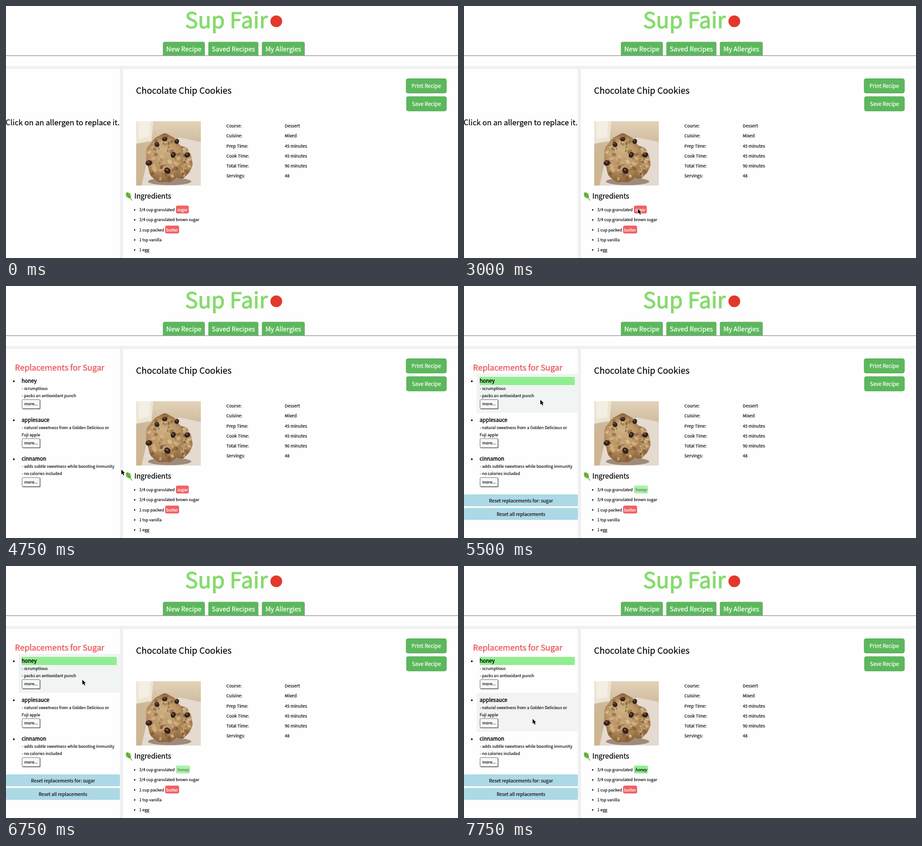
Animation, 1000 px wide and 560 px high, one loop 8000 ms. Source, as an HTML page with a canvas:

```html
<!DOCTYPE html>
<html lang="en">
<head>
<meta charset="utf-8">
<title>Recipe allergen replacement</title>
<style>
html, body { margin: 0; width: 100%; height: 100%; overflow: hidden; background: #fefefe; }
canvas { display: block; width: 1000px; height: 560px; }
</style>
</head>
<body>
<canvas id="stage"></canvas>
<script>
const LOOP = 8000, STEP = 250;
const FAMILY = '"Noto Sans CJK JP", "Noto Sans CJK SC", "Noto Sans CJK KR", "Noto Sans CJK TC", "Noto Sans CJK", "Open Sans", sans-serif';
const FONT_SCALE = 1 / 1.117; // this family's Latin letters run large
const GREEN = '#5cb85c', RED = '#f06263', MINT = '#90ee90', BLUE = '#add8e6', BLACK = '#050505';
const SMALL = 10.04, ROW = 22.25, SWAP_ROW = 86.6;

const canvas = document.getElementById('stage');
const ctx = canvas.getContext('2d');
const ratio = window.devicePixelRatio || 1;
canvas.width = 1000 * ratio;
canvas.height = 560 * ratio;

const linear = u => u;
const easeIn = power => u => u ** power;
const easeOut = power => u => 1 - (1 - u) ** power;

// The pointer rests between moves; x and y may ease differently.
const MOVES = [
  { start: 500, end: 1500, from: [410, 194], to: [427, 444], easeX: easeOut(4), easeY: easeOut(4) },
  { start: 1500, end: 2250, from: [427, 444], to: [384, 450], easeX: easeOut(2), easeY: easeOut(2) },
  { start: 4000, end: 5250, from: [384, 450], to: [168, 252], easeX: linear, easeY: easeIn(3) },
  { start: 6750, end: 7750, from: [168, 252], to: [151, 339], easeX: easeOut(2), easeY: easeOut(2) }
];

const DETAILS = [
  ['Course:', 'Dessert'], ['Cuisine:', 'Mixed'], ['Prep Time:', '45 minutes'],
  ['Cook Time:', '45 minutes'], ['Total Time:', '90 minutes'], ['Servings:', '48']
];
const INGREDIENTS = [
  '3/4 cup granulated', '3/4 cup granulated brown sugar', '1 cup packed', '1 tsp vanilla', '1 egg'
];
const SWAPS = [
  ['honey', '- scrumptious', '- packs an antioxidant punch'],
  ['applesauce', '- natural sweetness from a Golden Delicious or', 'Fuji apple'],
  ['cinnamon', '- adds subtle sweetness while boosting immunity', '- no calories included']
];

function seeded(seed) {
  return () => (seed = seed * 16807 % 2147483647) / 2147483647;
}

function text(str, x, y, size, { color = BLACK, align = 'left', heavy = .18, italic = false } = {}) {
  ctx.font = `${italic ? 'italic ' : ''}400 ${size * FONT_SCALE}px ${FAMILY}`;
  ctx.textAlign = align;
  ctx.lineJoin = 'round';
  ctx.lineWidth = heavy;
  ctx.fillStyle = ctx.strokeStyle = color;
  ctx.fillText(str, x, y);
  ctx.strokeText(str, x, y);
}

function rect(x, y, w, h, color) {
  ctx.fillStyle = color;
  ctx.fillRect(x, y, w, h);
}

function box(x, y, w, h, r, fill, border) {
  ctx.beginPath();
  ctx.roundRect(x, y, w, h, r);
  ctx.fillStyle = fill;
  ctx.fill();
  if (border) {
    ctx.strokeStyle = border;
    ctx.lineWidth = 1;
    ctx.stroke();
  }
}

function oval(x, y, rx, ry, color, turn = 0) {
  ctx.beginPath();
  ctx.ellipse(x, y, rx, ry, turn, 0, 2 * Math.PI);
  ctx.fillStyle = color;
  ctx.fill();
}

function shape(points, color) {
  ctx.beginPath();
  points.forEach(([x, y]) => ctx.lineTo(x, y));
  ctx.closePath();
  ctx.fillStyle = color;
  ctx.fill();
}

function drawHeader() {
  text('Sup Fair', 396, 49, 54, { color: '#86db6d', heavy: 1.3 });
  oval(598, 34, 13, 13, '#e2382c');

  let x = 347;
  ['New Recipe', 'Saved Recipes', 'My Allergies'].forEach(label => {
    ctx.font = `400 ${16 * FONT_SCALE}px ${FAMILY}`;
    const w = Math.round(ctx.measureText(label).width + 15.5);
    box(x + .5, 80, w - 1, 30, [3, 3, 0, 0], GREEN, '#78ad78');
    text(label, x + w / 2, 101, 16, { color: '#fff', align: 'center', heavy: .25 });
    x += w + 7.5;
  });
  rect(0, 109.7, 1000, 1.4, '#929292');
  rect(0, 133, 1000, 7, '#f0f0f0');
  rect(252, 133, 7, 427, '#f0f0f0');
}

function drawCookie(x, y, rx, ry, seed) {
  const random = seeded(seed);
  const edge = Array.from({ length: 60 }, (_, i) => {
    const a = i * Math.PI / 30;
    const k = 1 + .025 * Math.sin(5 * a + seed) + .015 * Math.sin(11 * a);
    return [x + rx * k * Math.cos(a), y + ry * k * Math.sin(a)];
  });
  const tone = ctx.createRadialGradient(x - 3, y - ry * .4, 4, x, y, ry * 1.05);
  tone.addColorStop(0, '#cdae80');
  tone.addColorStop(.6, '#b89262');
  tone.addColorStop(1, '#855b33');
  shape(edge, tone);

  for (let i = 0; i < 90; i++) {
    const a = random() * 2 * Math.PI, d = Math.sqrt(random()) * .92, size = 1 + random() * 3;
    const color = random() < .5 ? 'rgba(105,68,36,.45)' : 'rgba(226,200,158,.5)';
    oval(x + rx * d * Math.cos(a), y + ry * d * Math.sin(a), size * 1.4, size, color, a);
  }
}

function drawPhoto() {
  ctx.save();
  ctx.beginPath();
  ctx.rect(288, 256, 143, 143);
  ctx.clip();
  ctx.translate(288, 256);

  const back = ctx.createLinearGradient(0, 0, 0, 143);
  back.addColorStop(0, '#e2d3b9');
  back.addColorStop(.4, '#ccb798');
  back.addColorStop(1, '#cfb692');
  rect(0, 0, 143, 143, back);

  shape([[0, 0], [38, 0], [34, 44], [0, 50]], '#ece5d3');
  shape([[4, 0], [31, 0], [29, 34], [6, 40]], '#f4efe2');
  shape([[12, 143], [28, 70], [95, 36], [143, 46], [143, 143]], '#e4dad0');

  oval(74, 134, 48, 8, 'rgba(112,88,66,.6)');
  drawCookie(97, 91, 27, 36, 7);
  drawCookie(63, 83, 41, 54, 3);

  [[63, 40], [46, 52], [82, 75], [28, 93], [69, 110], [90, 45], [113, 75]].forEach(([x, y], i) => {
    const size = 4.5 + Math.min(y, 110) / 35;
    oval(x, y, size, size * .85, '#35221b', i);
    oval(x - 1, y - 2, size * .4, size * .2, '#866553', .4);
  });
  ctx.restore();
}

function drawLeaf() {
  const side = sign => Array.from({ length: 13 }, (_, i) => {
    const u = i / 12;
    return [u * 17, sign * (5.2 * Math.sin(Math.PI * u ** .8) + .6 * Math.sin(u * 20))];
  });
  ctx.save();
  ctx.translate(266.3, 414.5);
  ctx.rotate(.95);
  shape([...side(1), ...side(-1).reverse()], '#6fb63a');
  rect(2, -.6, 20, 1.2, '#549b2d');
  ctx.restore();
}

function drawTag(word, w, x, y, fill, style) {
  box(x, y, w, 17.6, 3.5, fill);
  text(word, x + w / 2, y + 12.7, SMALL, { align: 'center', heavy: .25, ...style });
}

function drawRecipe({ open, replaced, overHoney }) {
  text('Chocolate Chip Cookies', 287.4, 194.5, 21.54, { heavy: .25 });
  ['Print Recipe', 'Save Recipe'].forEach((label, i) => {
    const w = 89 - i * .7, y = 161.5 + i * 39.8;
    box(974.3 - w, y, w, 32, 4, GREEN, '#4cab4c');
    text(label, 974.3 - w / 2, y + 20.5, 12.86, { color: '#fff', align: 'center', heavy: .25 });
  });

  drawPhoto();
  DETAILS.forEach(([label, value], i) => {
    const y = 270 + i * ROW;
    text(label, 487.6, y, 10.73);
    text(value, 616.8, y, 10.73);
  });

  drawLeaf();
  text('Ingredients', 283.9, 428, 17.25, { heavy: .25 });
  INGREDIENTS.forEach((item, i) => {
    const y = 456 + i * ROW;
    oval(284.7, y - 3, 1.6, 1.6, BLACK);
    text(item, 294.8, y, SMALL);
  });

  if (!replaced) {
    drawTag('sugar', 28.4, 376, 443.4, RED, { color: '#fff', italic: open });
  } else {
    const style = overHoney ? { color: '#4c624c', heavy: .1 } : {};
    drawTag('honey', 31, 376, 443.4, overHoney ? '#a9f2a9' : MINT, { italic: true, ...style });
  }
  drawTag('butter', 31, 352, 443.4 + 2 * ROW, RED, { color: '#fff' });
}

function drawSwaps({ replaced, hovered }) {
  text('Replacements for Sugar', 19.8, 187.5, 20, { color: '#ee5c60', heavy: .5 });
  if (hovered >= 0) {
    rect(28, 195 + hovered * SWAP_ROW, 224, SWAP_ROW, hovered === 0 ? '#f0f4f2' : '#f3f3f3');
  }
  if (replaced) rect(35, 202, 210, 18, MINT);

  SWAPS.forEach(([name, first, second], i) => {
    const y = 215.2 + i * SWAP_ROW;
    oval(17.3, y - 3.5, 1.9, 1.9, BLACK);
    text(name, 34.6, y, 12.9, { heavy: .45 });
    text(first, 34.8, y + 16, SMALL);
    text(second, 34.8, y + 32, SMALL);
    box(36, y + 37.8, 40.3, 21, 2, '#777');
    box(35.5, y + 37.3, 39.5, 20, 2, '#f8f8f8', '#686868');
    text('more...', 55.3, y + 50.2, SMALL, { align: 'center' });
  });

  if (replaced) {
    ['Reset replacements for: sugar', 'Reset all replacements'].forEach((label, i) => {
      const y = 463 + i * 30.2;
      box(0, y, 252, 26.5, 3, BLUE);
      text(label, 126, y + 17.5, 11.45, { align: 'center' });
    });
  }
}

function drawPointer({ x, y }) {
  ctx.save();
  ctx.translate(x + .8, y + .8);
  ctx.beginPath();
  [[0, 0], [0, 10.6], [2.5, 8.4], [4.4, 12.8], [6.3, 12], [4.5, 7.7], [7.8, 7.6]]
    .forEach(([px, py]) => ctx.lineTo(px, py));
  ctx.closePath();
  ctx.lineJoin = 'round';
  ctx.strokeStyle = '#fff';
  ctx.lineWidth = 1.6;
  ctx.stroke();
  ctx.fillStyle = '#000';
  ctx.fill();
  ctx.restore();
}

function pointerAt(time) {
  const move = MOVES.filter(({ start }) => start <= time).pop();
  if (!move) return null;
  const { start, end, from, to, easeX, easeY } = move;
  const u = Math.min(1, (time - start) / (end - start));
  return {
    x: from[0] + (to[0] - from[0]) * easeX(u),
    y: from[1] + (to[1] - from[1]) * easeY(u)
  };
}

function hoveredSwap({ x, y }) {
  if (x < 28 || x >= 252) return -1;
  const row = Math.floor((y - 195) / SWAP_ROW);
  return row >= 0 && row < SWAPS.length ? row : -1;
}

function draw(time) {
  const pointer = pointerAt(time);
  const open = time >= 3500;
  const hovered = open ? hoveredSwap(pointer) : -1;
  const state = { open, replaced: time >= 5500, hovered, overHoney: hovered === 0 };

  ctx.setTransform(ratio, 0, 0, ratio, 0, 0);
  rect(0, 0, 1000, 560, '#fefefe');
  drawHeader();
  drawRecipe(state);
  if (open) drawSwaps(state);
  else text('Click on an allergen to replace it.', -.8, 264.5, 18.65, { heavy: .25 });
  if (pointer) drawPointer(pointer);
}

const begin = performance.now();
function tick() {
  const time = (performance.now() - begin) % LOOP;
  draw(Math.floor(time / STEP) * STEP);
  requestAnimationFrame(tick);
}
tick();
</script>
</body>
</html>
```
